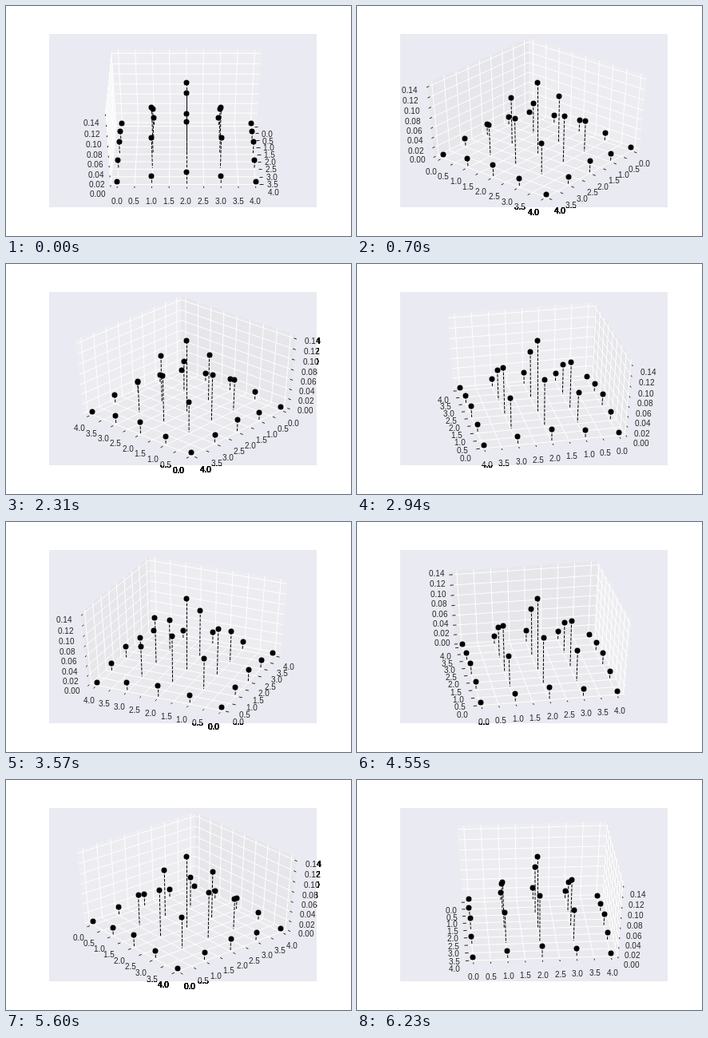
An HTML page with a canvas that plays this animation: 432x288 px, repeating every 6300 ms.

```html
<!DOCTYPE html>
<html lang="en">
<head>
<meta charset="utf-8">
<title>Rotating 3D stem plot</title>
<style>
  html, body { margin: 0; width: 100%; height: 100%; overflow: hidden; background: #fff; }
  canvas { display: block; width: 432px; height: 288px; }
</style>
</head>
<body>
<canvas id="plot" width="432" height="288"></canvas>
<script>
const ctx = document.getElementById('plot').getContext('2d');
const STEP = 70, STEPS = 90;
const BOX = { x: 54, y: 35, w: 335, h: 217 };
const INK = '#262626';
const WALL = 0.5 + 1 / 48, DELTA = 1 / 12, SPAN = 1 / 1.05;
const ELEV = 40 * Math.PI / 180, SE = Math.sin(ELEV), CE = Math.cos(ELEV);
const PANES = ['rgba(242,242,242,.5)', 'rgba(230,230,230,.5)', 'rgba(236,236,236,.5)'];

// Data to the unit cube centred on the origin
const flat = v => SPAN * (v / 4 - 0.5);
const tall = v => SPAN * ((v * 256 - 1) / 35 - 0.5);

const range = (n, f) => Array.from({ length: n }, (_, i) => f(i));
const halves = range(9, i => ({ at: flat(i / 2), text: (i / 2).toFixed(1) }));
const TICKS = [halves, halves, range(8, i => ({ at: tall(i / 50), text: (i / 50).toFixed(2) }))];

// Binomial 5 x 5 kernel
const ROW = [1, 4, 6, 4, 1];
const stems = range(25, i => {
  const a = i % 5, b = Math.floor(i / 5);
  return { x: flat(a), y: flat(b), z: tall(ROW[a] * ROW[b] / 256) };
});

let cosA = 1, sinA = 0;

function project([x, y, z]) {
  const near = x * cosA + y * sinA, side = y * cosA - x * sinA;
  const depth = 10 - near * CE - z * SE;
  return [225.92 + side * 1809.7 / depth, 140.34 - (z * CE - near * SE) * 1175.4 / depth];
}

function trace(points) {
  ctx.beginPath();
  points.forEach(p => ctx.lineTo(...project(p)));
}

function stroke(points, color) {
  trace(points);
  ctx.strokeStyle = color;
  ctx.stroke();
}

// Straight line, set on pixel centres when upright or level
function segment(p, q, color) {
  const a = project(p), b = project(q);
  const sharp = a.some((v, i) => Math.abs(v - b[i]) < 1e-4);
  const fit = v => sharp ? Math.round(v) + 0.5 : v;
  ctx.beginPath();
  ctx.moveTo(...a.map(fit));
  ctx.lineTo(...b.map(fit));
  ctx.strokeStyle = color;
  ctx.stroke();
}

// Copy of p with coordinate i replaced
function put(p, i, v) {
  const q = p.slice();
  q[i] = v;
  return q;
}
const flip = (p, i) => put(p, i, -p[i]);

function drawPane(back, i) {
  const j = (i + 1) % 3, k = (i + 2) % 3;
  trace([back, flip(back, j), flip(flip(back, j), k), flip(back, k)]);
  ctx.fillStyle = PANES[i];
  ctx.fill();
}

function drawLabel(text, x, y) {
  const width = ctx.measureText(text).width;
  const left = Math.floor(x - width / 2), base = Math.round(y + 6.5);
  ctx.fillStyle = INK;
  ctx.fillText(text, left, base);
  if (base <= BOX.y + BOX.h && left + width < BOX.x + BOX.w) return;
  // Glyphs beyond the plot area have hard edges
  ctx.save();
  ctx.beginPath();
  ctx.rect(0, 0, 432, 288);
  ctx.rect(BOX.x, BOX.y, BOX.w, BOX.h);
  ctx.clip('evenodd');
  ctx.fillStyle = '#000';
  for (let n = 0; n < 10; n++) ctx.fillText(text, left, base);
  ctx.restore();
}

function drawAxis(back, i) {
  const j = (i + 1) % 3, k = (i + 2) % 3;
  for (const t of TICKS[i]) {
    const p = put(back, i, t.at);
    stroke([flip(p, j), p, flip(p, k)], '#fff');
  }
  const dir = i === 0 ? 1 : 0;
  const edge = flip(back, dir), out = Math.sign(edge[dir]) * DELTA;
  for (const t of TICKS[i]) {
    const p = put(edge, i, t.at);
    segment(put(p, dir, p[dir] + out * 0.1), put(p, dir, p[dir] - out * 0.2), INK);
    const spot = p.map((v, n) => n === i ? v : v + Math.sign(v) * DELTA);
    drawLabel(t.text, ...project(spot));
  }
}

function drawStems() {
  const foot = tall(0);
  ctx.fillStyle = '#000';
  for (const s of stems) {
    const top = [s.x, s.y, s.z];
    ctx.setLineDash([3.7, 1.6]);
    segment(top, [s.x, s.y, foot], '#000');
    ctx.setLineDash([]);
    const [x, y] = project(top).map(Math.round);
    ctx.beginPath();
    ctx.arc(x, y, 3.5, 0, Math.PI * 2);
    ctx.fill();
  }
}

function draw(step) {
  const azim = step * 4 * Math.PI / 180;
  cosA = Math.cos(azim);
  sinA = Math.sin(azim);
  ctx.fillStyle = '#fff';
  ctx.fillRect(0, 0, 432, 288);
  ctx.fillStyle = '#eaeaf2';
  ctx.fillRect(BOX.x, BOX.y, BOX.w, BOX.h);
  ctx.font = '10px "Liberation Sans", Arial, sans-serif';
  ctx.lineWidth = 1;
  const back = [cosA >= 0 ? -WALL : WALL, sinA >= 0 ? -WALL : WALL, -WALL];
  for (let i = 0; i < 3; i++) drawPane(back, i);
  for (let i = 0; i < 3; i++) drawAxis(back, i);
  drawStems();
}

const start = performance.now();
let shown = -1;
function tick() {
  const step = Math.floor((performance.now() - start) / STEP) % STEPS;
  if (step !== shown) draw(shown = step);
  requestAnimationFrame(tick);
}
tick();
</script>
</body>
</html>
```
